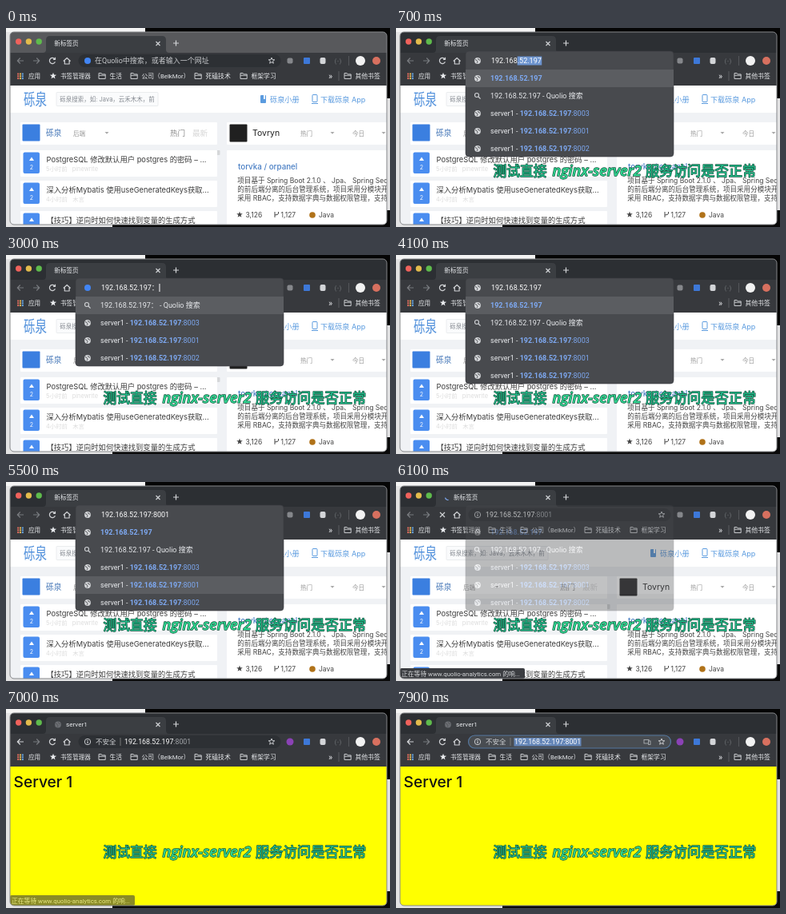
An HTML page for the animation above (8000 ms loop, 480 by 249 pixels).

```html
<!DOCTYPE html>
<html lang="zh">
<head>
<meta charset="utf-8">
<style>
html, body { margin: 0; width: 100%; height: 100%; overflow: hidden; background: #e6e6e6; }
svg { display: block; width: 480px; height: 249px; }
text { font-family: Roboto, "Noto Sans CJK SC", "Noto Sans CJK", sans-serif; white-space: pre; }
.page text { font-family: Inter, "Noto Sans CJK SC", "Noto Sans CJK", sans-serif; }
</style>
</head>
<body>
<svg id="stage" viewBox="0 0 480 249"></svg>
<script>
const LOOP = 8000, FOCUS = 400, ENTER = 5900, LOADED = 6200, SELECT = 7600;
const IP = '192.168.52.197', BLUE = '#7ea9f2', LIGHT = '#e8eaed';
const stage = document.getElementById('stage');
const clamp = v => Math.max(0, Math.min(1, v));

const rect = (x, y, w, h, fill, r = 0, extra = '') =>
  `<rect x="${x}" y="${y}" width="${w}" height="${h}" rx="${r}" fill="${fill}" ${extra}/>`;
const dot = (x, y, r, fill, extra = '') => `<circle cx="${x}" cy="${y}" r="${r}" fill="${fill}" ${extra}/>`;
const line = (d, color = '#d0d2d5', w = 1.2) =>
  `<path d="${d}" fill="none" stroke="${color}" stroke-width="${w}" stroke-linejoin="round"/>`;
const text = (x, y, s, size, fill, extra = '') =>
  `<text x="${x}" y="${y}" font-size="${size}" fill="${fill}" ${extra}>${s}</text>`;
const group = (opacity, s) => opacity > 0 ? `<g opacity="${opacity}">${s}</g>` : '';
const bold = s => `<tspan font-weight="700">${s}</tspan>`;
const tint = (s, color = BLUE) => `<tspan fill="${color}">${s}</tspan>`;
const caret = (x, y) => `<path d="M${x - 2.5} ${y}h5l-2.5 2.8z" fill="#aaa"/>`;

function star(x, y, r, fill, stroke = 'none') {
  const pts = Array.from({ length: 10 }, (_, i) => {
    const a = i * Math.PI / 5, q = i % 2 ? r * .42 : r;
    return (x + q * Math.sin(a)).toFixed(2) + ',' + (y - q * Math.cos(a)).toFixed(2);
  });
  return `<polygon points="${pts.join(' ')}" fill="${fill}" stroke="${stroke}"/>`;
}
const folder = x => line(`M${x - 4} 63.5v-7h3.2l1 1.4h4v5.6zM${x - 4} 59.2h8.2`, '#c8cacd', 1);
const globe = (x, y, c = '#d5d7da') => dot(x, y, 3.9, c) +
  line(`M${x - 3} ${y - 1.5}l2 1 1 2-1 1.6M${x + .5} ${y - 3}l.5 1.5 2 .8`, '#55575b', 1);
const lens = (x, y) => dot(x - 1, y - 1, 2.5, 'none', 'stroke="#d0d2d5" stroke-width="1.1"') +
  line(`M${x + 1} ${y + 1}l2.6 2.6`);
const info = (x, y) => dot(x, y, 3.7, 'none', 'stroke="#c8cacd"') + line(`M${x} ${y - .5}v2.5M${x} ${y - 2}v.9`);

const digitWidths = { '.': 2.37, ':': 2.2, '：': 9 };
const width = s => [...s].reduce((w, c) => w + (digitWidths[c] || 5.05), 0);

const desktop = rect(0, 0, 480, 249, '#e3e3e4') + rect(174, 0, 306, 88, '#050505') +
  rect(0, 0, 174, 5, '#f4f4f4') + rect(133, 228, 347, 21, '#0a0a0a');

const bookmarks = () => {
  let s = '';
  for (let i = 0; i < 9; i++)
    s += rect(14.2 + i % 3 * 2.8, 56.5 + (i / 3 | 0) * 2.8, 2, 2, ['#e8705f', '#e3b64f', '#68a9e8'][i % 3]);
  s += text(28, 63, '应用', 7.6, LIGHT) + star(64 - 5, 60, 4.3, LIGHT) + text(68, 63, '书签管理器', 7.6, LIGHT);
  [[120, '生活'], [160, '公司（BelkMor）'], [240, '死磕技术'], [297, '框架学习'], [427, '其他书签']]
    .forEach(([x, label]) => s += folder(x) + text(x + 9.5, 63, label, 7.8, LIGHT));
  return s + text(403, 63.5, '»', 11, LIGHT) + rect(415.5, 54, 1, 12, '#5c5e62');
};

function post(y, title, meta) {
  return rect(18, y, 246, 33, '#fff', 1) + rect(21.5, y + 2.5, 20.5, 26.5, '#4a8df0', 2) +
    `<path d="M29 ${y + 13}l3-4.5 3 4.5z" fill="#fff"/>` +
    text(32, y + 23.5, '2', 7, '#fff', 'text-anchor="middle"') +
    text(50.5, y + 14.5, title, 9.3, '#3c3c3c') + text(50, y + 25.5, meta, 7.4, '#dcdcdc');
}

const newsPage = '<g class="page">' + rect(5, 72, 471, 175, '#f0f2f5') + rect(5, 72, 471, 34, '#fff') +
  text(22, 97, '砾泉', 14.5, '#4f8fdb', 'transform="translate(0 -38.8) scale(1 1.4)"') +
  rect(63, 80.5, 127, 17, '#fafbfc', 1, 'stroke="#eaecee"') +
  text(67.3, 92, '砾泉搜索，如: Java，云禾木木，前', 7.5, '#858a91') +
  rect(318, 84, 7, 10, '#5b9bdf', 1) + rect(322, 84, 2, 5, '#fff') +
  text(330, 92.5, '砾泉小册', 9.2, '#5b9bdf') +
  rect(383, 83.5, 6, 9, 'none', 1, 'stroke="#5b9bdf"') + line('M382 94.5h8', '#5b9bdf') +
  text(393, 92.5, '下载砾泉 App', 9.1, '#5b9bdf') +
  rect(18, 118, 246, 28, '#fff', 1) + rect(20.5, 120.5, 22, 21, '#3b7fe0', 1) +
  text(50, 135, '砾泉', 9.7, '#4778b8') + text(84, 134.5, '后端', 7.6, '#999') + caret(126, 130) +
  text(205, 135, '热门', 9.6, '#8b8b8b') + text(233, 135, '最新', 9.6, '#d5d5d5') +
  rect(263.5, 153, 4, 6, '#d5d7d9', 1) +
  post(153, 'PostgreSQL 修改默认用户 postgres 的密码 – ...', '5小时前 &#160; pinewrite') +
  post(191, '深入分析Mybatis 使用useGeneratedKeys获取...', '4小时前 &#160; 木言') +
  post(229, '【技巧】逆向时如何快速找到变量的生成方式', '') +
  rect(276, 118, 200, 28, '#fff', 1) + rect(279.5, 120.5, 22, 22, '#202020', 1) +
  text(308, 135, 'Tovryn', 10.5, '#222') +
  text(368, 134.5, '热门', 7.6, '#999') + caret(408, 130) + text(433, 134.5, '今日', 7.6, '#999') + caret(472, 130) +
  rect(276, 153, 200, 94, '#fff', 1) +
  text(290, 177, 'torvka / orpanel', 9.8, '#4a7fc4', 'font-weight="500"') +
  ['项目基于 Spring Boot 2.1.0 、 Jpa、 Spring Sec', '的前后端分离的后台管理系统，项目采用分模块开',
    '采用 RBAC，支持数据字典与数据权限管理，支持']
    .map((s, i) => text(289.3, 194 + i * 11, s, 8.55, '#444')).join('') +
  star(292, 233.5, 4, '#444') + text(299.5, 237, '3,126', 8.5, '#444') +
  line('M336 230v7M340.500 230v2q0 2-4.500 2', '#444', 1) + text(343.5, 237, '1,127', 8.5, '#444') +
  dot(383, 234, 3.8, '#b07219') + text(391, 237, 'Java', 8.5, '#444') + '</g>';

const serverPage = '<g class="page">' + rect(5, 72, 471, 175, '#ffff00') +
  text(9.5, 98, 'Server 1', 19.2, '#111', 'font-weight="500"') + '</g>';

function tabStrip(ms) {
  const loading = ms >= ENTER && ms < LOADED, loaded = ms >= LOADED;
  const inactive = 1 - clamp((ms - 100) / 300);
  let s = rect(5, 5, 471, 28, '#2c2f33') + group(inactive, rect(5, 5, 471, 28, '#58595c')) +
    '<path d="M46 31q4 0 4-4V15q0-5 5-5h140q5 0 5 5v12q0 4 4 4z" fill="#3b3e42"/>' +
    dot(15.7, 17, 3.7, '#f0625c') + dot(28.4, 17, 3.7, '#e3bb4c') + dot(41.2, 17, 3.7, '#5fbb4c');
  if (loading) {
    const a = ms / 2 % 360;
    s += `<path d="M65 15.500a3.500 3.500 0 0 1 3.500 3.500" fill="none" stroke="${BLUE}" stroke-width="1.200" transform="rotate(${a} 65 19)"/>`;
  }
  if (loaded) s += globe(65, 19.5, '#6a6d72');
  s += text(loaded ? 75 : loading ? 72 : 60.3, 22, loaded ? 'server1' : '新标签页', loaded ? 8.1 : 7.6, LIGHT);
  return s + line('M187.500 17l5 5m0-5l-5 5') + line('M212.500 15.500v7M209 19h7');
}

function toolbar(ms) {
  const loading = ms >= ENTER && ms < LOADED, loaded = ms >= LOADED, selected = ms >= SELECT;
  let s = rect(5, 31, 471, 41, '#37393d') +
    line('M22 41h-7.500m3.300-3.500L14.300 41l3.500 3.500', ms < LOADED ? '#777a7e' : '#d0d2d5') +
    line('M34 41h7.500m-3.300-3.500l3.500 3.500-3.500 3.500', '#777a7e') +
    (loading ? line('M55 38l6 6m0-6l-6 6') : line('M61 39a3.600 3.600 0 1 0 .4 3.200M61.500 36.800V39.400H58.900')) +
    line('M71.800 41.500l4.400-4 4.400 4M73.300 41v4h5.800v-4') +
    rect(90.5, 33, 253, 16, selected ? '#484c51' : '#2d3034', 8, selected ? 'stroke="#55789f" stroke-width="1.200"' : '') +
    star(332, 41, 4, 'none', '#c8cacd');
  if (ms < ENTER) s += dot(102, 41, 4, '#4285f4') + text(111, 44.2, '在Quolio中搜索，或者输入一个网址', 9, '#c8cacd');
  else {
    const x = loaded ? 148 : 112;
    s += info(102, 41);
    if (loaded) s += text(112, 44.2, '不安全', 8.5, '#cfd1d4') + rect(142.5, 36, 1, 10, '#777');
    if (selected) s += rect(147.5, 36, 84, 10.5, '#6486b8') +
      rect(310, 38.5, 6, 4.5, 'none', 0, 'stroke="#b5b8bc" stroke-width=".8"') +
      rect(315.5, 40, 2.5, 4.5, '#484c51', 0, 'stroke="#b5b8bc" stroke-width=".8"');
    s += text(x, 44.2, IP + tint(':8001', selected ? '#fff' : '#a2a5a9'), 8.8, '#fff');
  }
  return s + (loaded ? dot(355, 41, 4.5, '#8b42b6') : rect(351.5, 37.5, 7, 7, '#85878b', 2)) +
    rect(372, 37, 8, 8, '#3d78d8', 1) + rect(392.5, 37, 7, 8, '#d3d5d8', 2) +
    text(415, 43.5, '(··)', 7, '#75787c', 'text-anchor="middle"') + rect(428, 35, 1, 12, '#55575b') +
    dot(443, 41, 6, '#f2f2f2') + dot(463, 41, 5, '#d8705f') + bookmarks();
}

// What the address box holds and suggests at a given time
function query(ms) {
  const search = s => ({ icon: lens, label: `${s} - Quolio 搜索` });
  const server = port => ({ icon: globe, label: 'server1 - ' + tint(bold(IP) + ':' + port), url: `${IP}:${port}` });
  const host = { icon: globe, label: tint(bold(IP)) };
  const servers = [8003, 8001, 8002].map(server);
  const hostRows = [host, search(IP), ...servers];
  if (ms < 1300) {
    const typed = IP.slice(0, 1 + 2 * Math.floor((ms - FOCUS) / 100));
    return { typed, rest: IP.slice(typed.length), rows: hostRows, active: 0 };
  }
  const colon = IP + '：';
  if (ms < 1700)
    return { typed: colon, rest: '8003', rows: [servers[0], search(colon), servers[1], servers[2], host], active: 0 };
  if (ms < 3400) return { typed: colon, rest: '', rows: [search(colon), ...servers], active: 0, searching: true };
  const active = ms < 4500 ? 0 : ms < 4900 ? 1 : ms < 5300 ? 2 : 3;
  return { typed: hostRows[active].url || IP, rest: '', rows: hostRows, active };
}

function dropdown(ms) {
  const q = query(Math.min(ms, ENTER - 1)), end = 119 + width(q.typed);
  const fade = 1 - clamp((ms - ENTER) / 320);
  let s = rect(87, 29, 260, 22 * (q.rows.length + 1), '#484a4e', 4, 'stroke="#3a3c40" stroke-width=".6"') +
    rect(87, 52, 260, 22, '#5b5d61', 0, `transform="translate(0 ${q.active * 22})"`);
  if (ms < ENTER) {
    s += q.searching ? dot(102, 41, 4, '#4285f4') : globe(102, 41);
    if (q.rest) s += rect(end, 35.5, width(q.rest) + .6, 11, '#6d94cf');
    s += text(119, 44.2, q.typed + q.rest, 9, '#fff');
    const blink = (ms + 500) % 1000, on = clamp(blink / 200) * (1 - clamp((blink - 500) / 200));
    if (q.searching) s += group(on, rect(end + .8, 36, 1, 10, '#fff'));
  }
  q.rows.forEach((row, i) => s += row.icon(102, 63 + 22 * i) + text(118, 66 + 22 * i, row.label, 9, LIGHT));
  return group(fade, s);
}

const caption = `<g font-weight="500" stroke="#14503c" stroke-width="1.3" stroke-linejoin="round" paint-order="stroke">` +
  text(121.5, 184.5, '测试直接', 16.8, '#20c08c') +
  text(195.5, 184.5, 'nginx-server2', 18.1, '#2ed58f', 'style="font-family:\'Open Sans\',\'Noto Sans\',sans-serif" font-style="italic" font-weight="600"') +
  text(312, 184.5, '服务访问是否正常', 17.3, '#20c08c') + '</g>';

const status = rect(5, 233, 156, 13, '#3b3d41', 2) +
  text(7, 242.5, '正在等待 www.quolio-analytics.com 的响...', 7.8, '#d5d7da');

const frame = rect(5, 5, 471, 241, 'none', 5, 'stroke="#85878a" stroke-width="1"');

function draw(now) {
  const ms = now % LOOP;
  const statusOpacity = clamp((ms - ENTER) / 100) * (1 - clamp((ms - 6900) / 250));
  stage.innerHTML = '<clipPath id="window"><rect x="5" y="5" width="471" height="241" rx="5"/></clipPath>' + desktop +
    '<g clip-path="url(#window)">' + tabStrip(ms) + toolbar(ms) + (ms < LOADED ? newsPage : serverPage) +
    group(statusOpacity, status) + '</g>' + frame +
    (ms >= FOCUS && ms < ENTER + 320 ? dropdown(ms) : '') +
    group(clamp((ms - 100) / 400), caption);
  requestAnimationFrame(() => draw(performance.now()));
}
draw(0);
</script>
</body>
</html>
```
